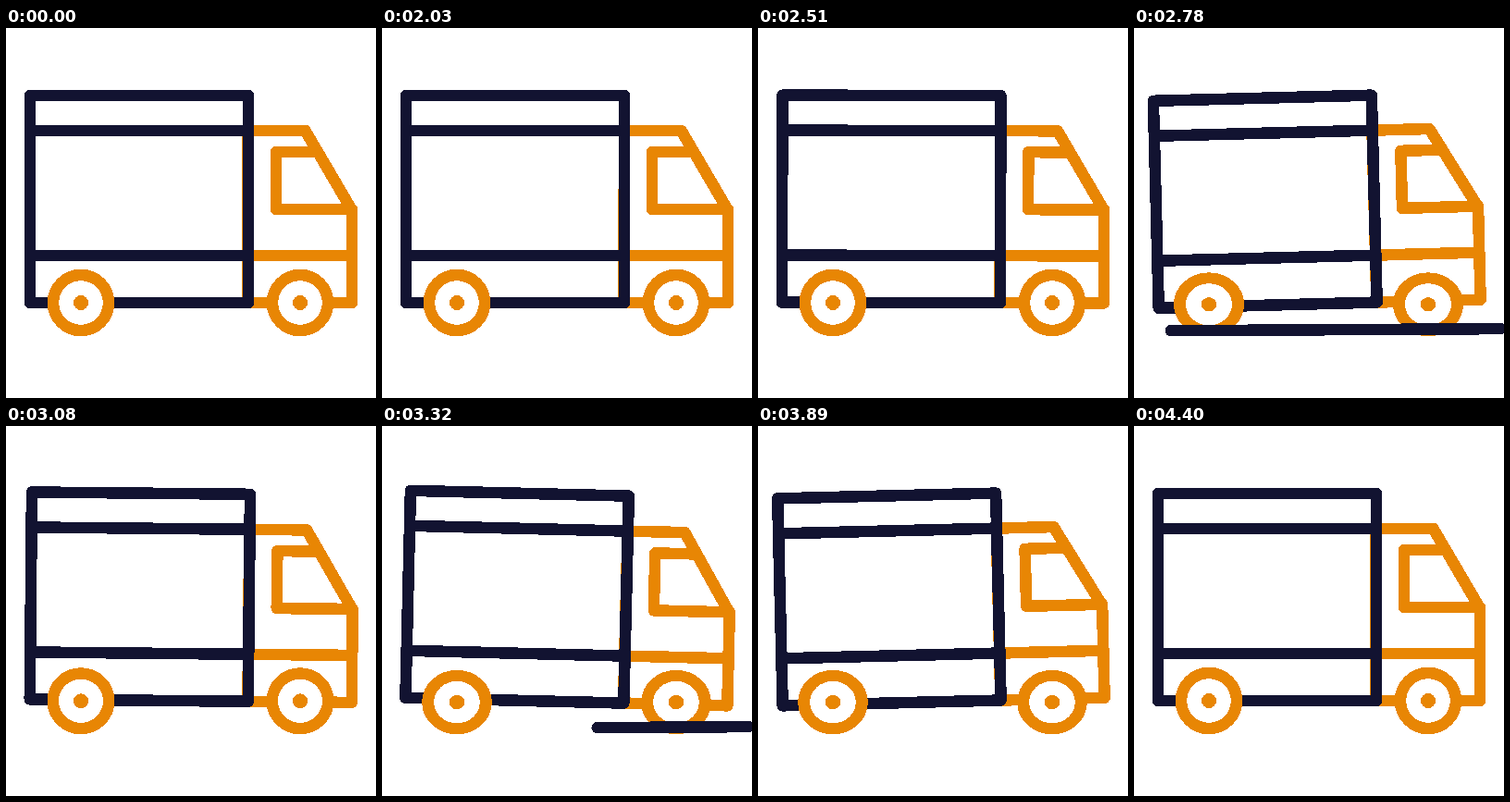
These frames come from a looping animation (400x400 px, 4.43 s). An HTML page:

```html
<!DOCTYPE html>
<html>
<head>
<meta charset="utf-8">
<style>
html, body { margin: 0; width: 100%; height: 100%; overflow: hidden; background: #fff; }
svg { display: block; width: 100vw; height: 100vh; shape-rendering: crispEdges; }
path, circle { fill: none; stroke-width: 12.5; stroke-linecap: round; stroke-linejoin: round; }
.navy { stroke: #121331; }
.orange { stroke: #e88604; }
.wheel circle { fill: #fff; }
.wheel .hub { fill: #e88604; stroke: none; }
</style>
</head>
<body>
<svg viewBox="0 0 400 400">
  <g id="truck">
    <path class="orange" d="M261.7 111H323.5L374 197V297H261.7ZM336 134H292V196H374M262 246H374"/>
    <path class="navy" d="M26 73H262V297H26ZM26 111H262M26 246H262"/>
  </g>
  <g class="wheel" data-x="81"><circle class="orange" r="30"/><circle class="hub" r="8"/></g>
  <g class="wheel" data-x="318"><circle class="orange" r="30"/><circle class="hub" r="8"/></g>
  <path id="road" class="navy"/>
</svg>
<script>
const LOOP = 4430, PAUSE = 2000, STEP = 30;
const ROAD_PASS = 20, ROAD_PASSES = 3;
// Rocking poses: [step, tilt], tilt 1 = 1.5 degrees
const ROCK = [[0, 0], [9, 1], [26, -1], [42, 1], [60, -1], [79, 0], [81, 0]];

const $ = id => document.getElementById(id);
const wheels = document.querySelectorAll('.wheel');
const ease = p => (1 - Math.cos(Math.PI * Math.min(1, Math.max(0, p)))) / 2;

function tiltAt(k) {
  const i = ROCK.findIndex(([end]) => k < end);
  const [k0, a] = ROCK[i - 1], [k1, b] = ROCK[i];
  return a + (b - a) * ease((k - k0) / (k1 - k0));
}

const roadX = p => 396 - 456 * ease(p);
const roadY = x => 327.5 - x * 0.006;

function drawRoad(k) {
  const p = k % ROAD_PASS;
  const visible = k < ROAD_PASS * ROAD_PASSES && p > 1.1 && p < 14.8;
  const left = roadX((p - 1.1) / 7.1), right = roadX((p - 6.2) / 8.4);
  $('road').setAttribute('d', visible ? `M${left} ${roadY(left)}L${right} ${roadY(right)}` : '');
}

function draw(time) {
  const k = Math.max(0, Math.floor((time % LOOP - PAUSE) / STEP));
  const tilt = tiltAt(k), squash = tilt * tilt;
  $('truck').setAttribute('transform', `translate(0 ${1.2 * squash}) rotate(${tilt * 1.5} 200 271)`);
  for (const wheel of wheels) {
    wheel.setAttribute('transform',
      `translate(${wheel.dataset.x} 333) scale(${1 + 0.05 * squash} ${1 - 0.05 * squash}) translate(0 -36)`);
  }
  drawRoad(k);
}

const start = performance.now();
function tick() {
  draw(performance.now() - start);
  requestAnimationFrame(tick);
}
tick();
</script>
</body>
</html>
```
